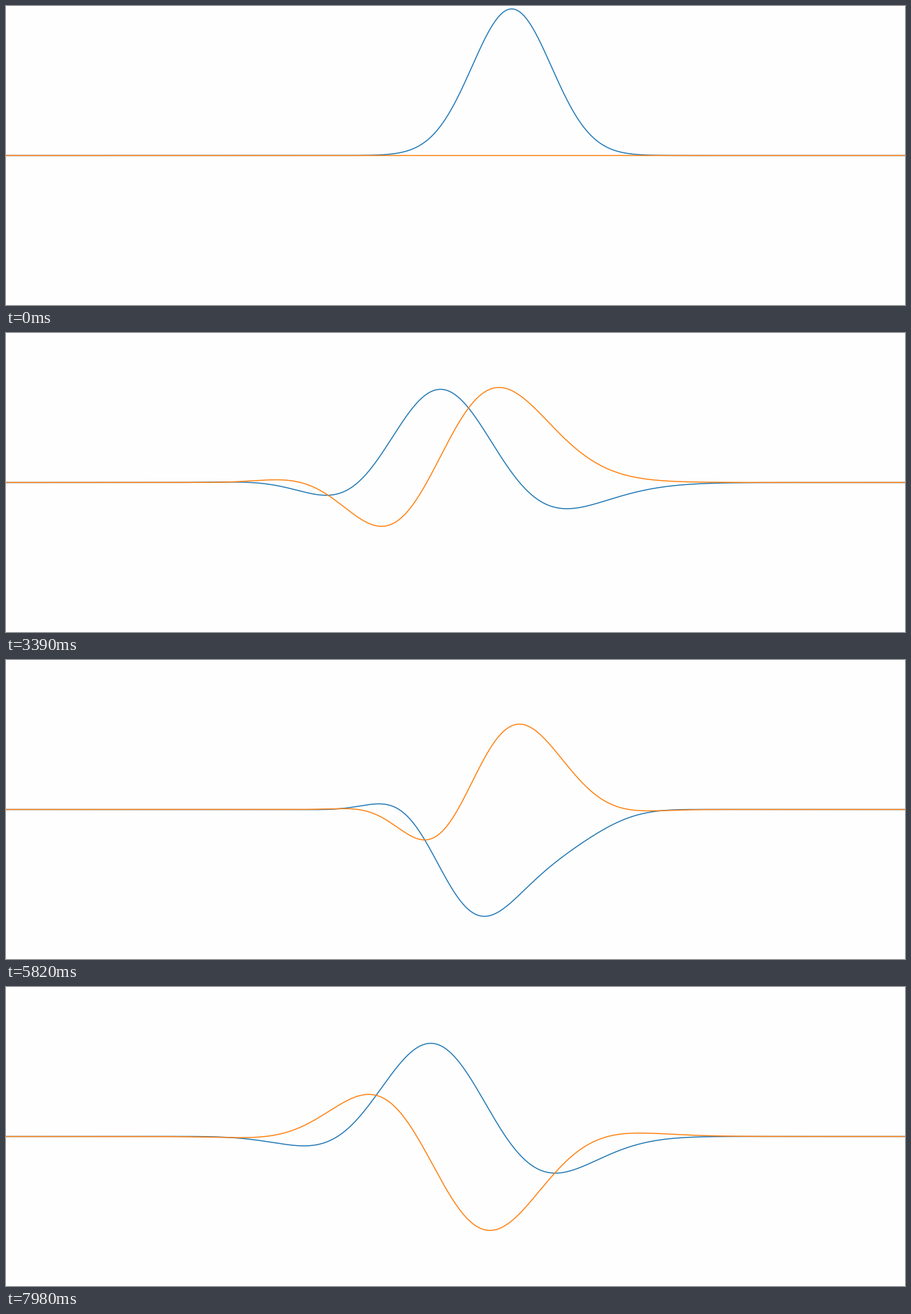
Recreate the animation shown at these times as a matplotlib script. Size 1280 by 427 pixels, loop 8000 ms.

```python
import numpy as np
import matplotlib.pyplot as plt
from matplotlib.animation import FuncAnimation

WIDTH, HEIGHT, DPI = 1280, 427, 64
LOOP, TICK = 8000, 20      # ms
STEP, DT = 30, 0.1         # ms per simulation step, time units per step
A0, X0 = 2.0, 1.0          # initial packet exp(-A0/2 (x - X0)^2)
BLUE, ORANGE = "#1f77b4", "#ff7f0e"

x = np.linspace(-8, 8, WIDTH + 1)


def packet(t):
    """Squeezed Gaussian in a harmonic well, exact solution at time t."""
    cos, sin = np.cos(t), np.sin(t)
    u = cos + 1j * A0 * sin
    # continuous branch of u ** -0.5
    phase = np.angle(u * np.exp(-1j * t)) + t
    scale = abs(u) ** -0.5 * np.exp(-0.5j * phase)
    a = (A0 * cos + 1j * sin) / u
    b = A0 * X0 / u
    c = -A0 * X0**2 / 2 + 0.5j * (A0 * X0) ** 2 * sin / u
    return scale * np.exp(c + b * x - a * x**2 / 2)


fig = plt.figure(figsize=(WIDTH / DPI, HEIGHT / DPI), dpi=DPI, facecolor="#fefefe")
ax = fig.add_axes([0, 0, 1, 1])
ax.set(xlim=(-8, 8), ylim=(-1.02, 1.02))
ax.axis("off")

width = 1.45 * 72 / DPI
real, = ax.plot(x, 0 * x, color=BLUE, lw=width)
imag, = ax.plot(x, 0 * x, color=ORANGE, lw=width)


def update(i):
    step = (i * TICK + TICK // 2) // STEP
    psi = packet(step * DT)
    real.set_ydata(psi.real)
    imag.set_ydata(psi.imag)
    return real, imag


anim = FuncAnimation(fig, update, frames=LOOP // TICK, interval=TICK,
                     repeat=True, repeat_delay=0, blit=False)
plt.show()
```
